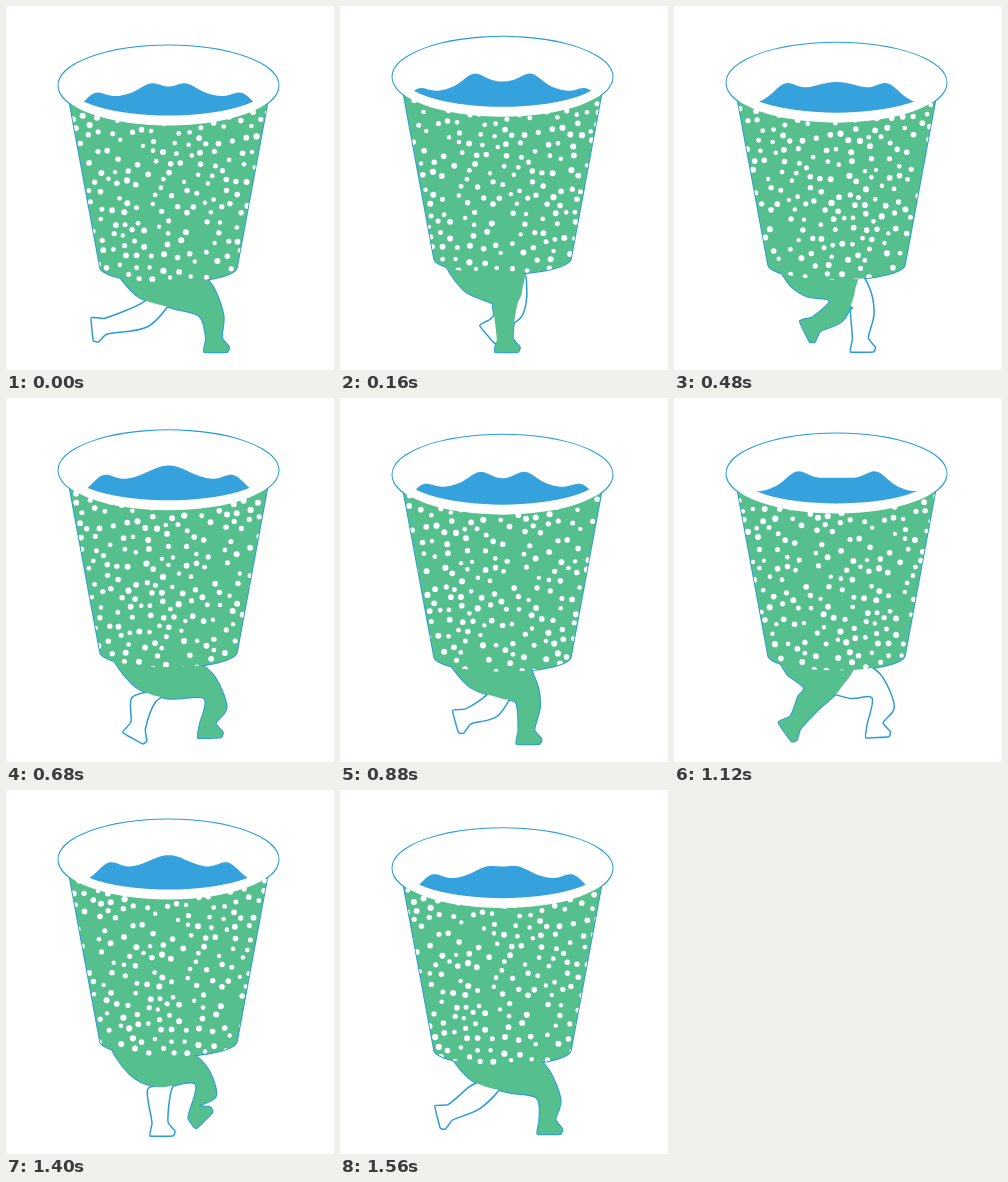
These frames come from a looping animation (328 by 364 pixels, 1600 ms). An HTML page:

```html
<!DOCTYPE html>
<html lang="en">
<head>
<meta charset="utf-8">
<title>Running cup</title>
<style>
  html, body { margin: 0; width: 100%; height: 100%; overflow: hidden; background: #fff; }
  svg { display: block; }
  .line { fill: none; stroke: #2b9cdb; stroke-width: 2; }
  .green { fill: #55bf8e; }
  .white { fill: #fff; }
</style>
</head>
<body>
<svg width="328" height="364" viewBox="0 0 328 364">
  <defs>
    <path id="cup" d="M64 98L94 260A68.5 16 0 0 0 231 260L261 98Z"/>
    <ellipse id="rim" cx="162.5" cy="79" rx="110" ry="40"/>
    <clipPath id="cupClip"><use href="#cup"/></clipPath>
    <clipPath id="waterClip"><ellipse cx="162.5" cy="79" rx="100" ry="30"/></clipPath>
  </defs>
  <g class="bob line"><use href="#cup"/><use href="#rim"/></g>
  <path class="near line"/>
  <path class="far white" stroke="#2b9cdb" stroke-width="1.5"/>
  <path class="near green"/>
  <g class="bob">
    <use href="#cup" class="green"/>
    <g clip-path="url(#cupClip)"><g id="dots" class="white"></g></g>
    <use href="#rim" class="white"/>
    <g clip-path="url(#waterClip)"><path id="water" fill="#35a1dd"/></g>
  </g>
</svg>
<script>
const LOOP = 1600, STEP = 40, STRIDE = 800;
const TILE = 280, DOTS = 300, GAP = 8.5;
const { PI, sin, cos, min, max, hypot } = Math;
const all = s => document.querySelectorAll(s);
const dots = document.getElementById('dots');
const water = document.getElementById('water');

const wave = turns => cos(2 * PI * turns);
const bob = phase => 5 * wave(2 * phase - .02);
const smooth = (a, b, v) => {
  const t = min(1, max(0, (v - a) / (b - a)));
  return t * t * (3 - 2 * t);
};

// The first half of a stride is on the ground, the second half swings forward.
function footAt(phase) {
  const x = phase < .5 ? 208 - 216 * phase : 100 + 108 * sin((phase - .5) * PI);
  const y = 332 - 14 * max(0, sin(PI * (phase - .27) / .73));
  const kick = phase > .7 && phase < .9 ? sin(5 * PI * (phase - .7)) ** 2 : 0;
  const pitch = 85 * (smooth(.25, .5, phase) - smooth(.5, .9, phase)) - 58 * kick;
  return { x, y, pitch: pitch * PI / 180 };
}

// lead: how far the swing runs ahead; hip: shift of the thigh's back edge
function legPath(phase, lead, hip) {
  if (phase > .5) phase += lead * sin(2 * PI * (phase - .5));
  const front = wave(phase + .08), back = wave(phase);
  const foot = footAt(phase);
  const knee = { x: 172 + 38 * front, y: 304 + bob(phase) };

  const dx = foot.x - knee.x, dy = foot.y - knee.y, len = hypot(dx, dy);
  const kneeSide = w => [knee.x + dy / len * w, knee.y - dx / len * w];
  const c = cos(foot.pitch), s = sin(foot.pitch);
  const sole = (u, v) => [foot.x + u * c - v * s, foot.y + u * s + v * c];

  return outline([
    [178, 262], [186 + 20 * front, 283 - 8 * front], kneeSide(12),
    sole(8, 0), sole(15, 9), sole(13, 14), sole(-10, 14), sole(-8, 1),
    kneeSide(-12), [146 + hip + 20 * back, 295 + 7 * back],
    [120 + hip + 10 * back, 281 + 8 * back], [108 + hip, 252]
  ]);
}

function outline(pts) {
  const n = pts.length, at = k => pts[(k + n) % n];
  let d = 'M' + at(0);
  for (let k = 0; k < n; k++) {
    const [p, q, r, s] = [at(k - 1), at(k), at(k + 1), at(k + 2)];
    const bend = k > 2 && k < 7 ? .05 : .16;   // the foot stays angular
    const c1 = q.map((v, j) => v + (r[j] - p[j]) * bend);
    const c2 = r.map((v, j) => v - (s[j] - q[j]) * bend);
    d += `C${c1} ${c2} ${r}`;
  }
  return d + 'Z';
}

// Ripples leave the middle in pairs and travel to both sides.
function waterPath(phase) {
  let d = 'M60 125';
  for (let x = 60; x <= 265; x += 2) {
    const off = x - 162.5;
    let y = 84 + .0024 * off * off;
    for (let k = -1; k < 2; k++) {
      const pos = 17 + 57 * (phase + k);
      const amp = min(10.5, max(0, (pos + 20) * .21));
      const size = max(10, 17 - .4 * max(0, pos));
      for (const c of [pos, -pos])
        y -= amp * Math.exp(-((off - c) ** 2) / (2 * size * size));
    }
    d += `L${x} ${y.toFixed(2)}`;
  }
  return d + 'L265 125Z';
}

let seed = 17;
const rnd = () => (seed = seed * 16807 % 2147483647) / 2147483647;

// Scattered dots that keep a gap, on a tile that repeats sideways.
function makeDots() {
  const spots = [];
  const near = (a, b) => {
    const dx = Math.abs(a.x - b.x);
    return hypot(min(dx, TILE - dx), a.y - b.y) < GAP;
  };
  for (let tries = 0; spots.length < DOTS && tries < 9000; tries++) {
    const spot = { x: rnd() * TILE, y: 100 + rnd() * 180, r: 2.2 + rnd() * .9 };
    if (!spots.some(o => near(o, spot))) spots.push(spot);
  }
  dots.innerHTML = [-TILE, 0, TILE, 2 * TILE].flatMap(dx => spots.map(o =>
    `<circle cx="${(o.x + dx).toFixed(1)}" cy="${o.y.toFixed(1)}" r="${o.r.toFixed(1)}"/>`
  )).join('');
}

function draw(ms) {
  const t = Math.floor(ms % LOOP / STEP) * STEP;
  const phase = t % STRIDE / STRIDE;
  const lift = bob(phase) - 4.5;
  all('.bob').forEach(g => g.setAttribute('transform', `translate(0 ${lift.toFixed(2)})`));
  const nearLeg = legPath(phase, .05, 0);
  all('.near').forEach(p => p.setAttribute('d', nearLeg));
  all('.far')[0].setAttribute('d', legPath((phase + .5) % 1, -.025, 14));
  water.setAttribute('d', waterPath(phase));
  dots.setAttribute('transform', `translate(${-TILE * t / LOOP} 0)`);
}

makeDots();
draw(0);
const start = performance.now();
function tick() {
  draw(performance.now() - start);
  requestAnimationFrame(tick);
}
requestAnimationFrame(tick);
</script>
</body>
</html>
```
